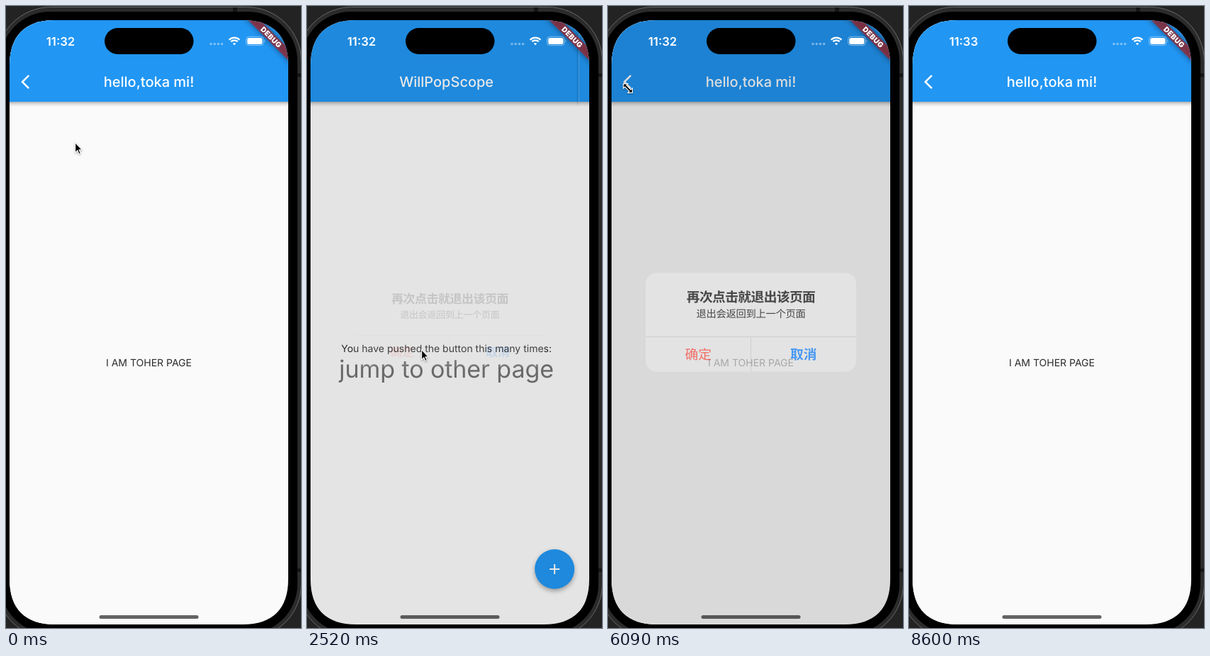
Animation of 416x877 px, one loop 8.62 s. Source, as an HTML page:

```html
<!DOCTYPE html>
<html lang="en">
<head>
<meta charset="utf-8">
<title>Confirm before leaving</title>
<style>
  html, body { margin: 0; width: 100%; height: 100%; overflow: hidden; background: #000; }
  svg { display: block; width: 100%; height: 100%; }
  text { font-family: Inter, Roboto, sans-serif; text-anchor: middle; text-rendering: geometricPrecision; }
  .bar-title { font-size: 20px; font-weight: 500; fill: #fff; }
  .body { font-size: 14px; fill: #2b2b2b; }
  .headline { font-size: 34px; letter-spacing: -.07px; fill: #737373; }
  .clock { font-size: 16.7px; font-weight: 600; fill: #fff; }
  .debug { font-size: 10.2px; font-weight: 900; letter-spacing: .3px; fill: #fff; }
  #alert text { font-family: "Noto Sans CJK SC", "Noto Sans CJK", sans-serif; font-size: 17px; }
  #alert .title { font-weight: 700; letter-spacing: -.5px; }
  #alert .note { font-size: 13px; letter-spacing: -.25px; }
  #alert .cancel { font-weight: 700; fill: #007aff; }
  #alert .ok { fill: #ff3b30; }
  .fab { filter: drop-shadow(0 3px 3px rgba(0, 0, 0, .32)); }
  .ribbon { filter: drop-shadow(0 0 4px rgba(0, 0, 0, .75)); }
  .pointer { fill: #000; stroke: #fff; stroke-width: 1.1; filter: drop-shadow(0 1px 1px rgba(0, 0, 0, .35)); }
</style>
</head>
<body>
<svg viewBox="0 0 416 877" preserveAspectRatio="none">
  <defs>
    <clipPath id="screen">
      <path d="M5 84C5 42 27 20 69 20H334C376 20 398 42 398 84V808C398 850 376 872 334 872H69C27 872 5 850 5 808Z"/>
    </clipPath>
    <linearGradient id="under" x2="0" y2="1">
      <stop stop-opacity=".3"/>
      <stop offset=".4" stop-opacity=".13"/>
      <stop offset="1" stop-opacity="0"/>
    </linearGradient>
    <g id="sheet">
      <rect x="5" y="20" width="393" height="852" fill="#fafafa"/>
      <rect x="5" y="135" width="393" height="7" fill="url(#under)"/>
      <rect x="5" y="20" width="393" height="115" fill="#2196f3"/>
    </g>
  </defs>

  <!-- device body -->
  <rect width="416" height="877" fill="#232323"/>
  <rect x="-13.5" y="1.5" width="430" height="890" rx="77" fill="#2b2b2b" stroke="#686868"/>
  <path d="M320 2h6v6h-6zM411 95h5v5h-5zM411 793h5v5h-5z" fill="#151515"/>
  <rect x="-8" y="8" width="419" height="877" rx="70"/>

  <g clip-path="url(#screen)">
    <g id="home">
      <use href="#sheet"/>
      <text class="bar-title" x="201.5" y="114">WillPopScope</text>
      <text class="body" x="201.5" y="487.5">You have pushed the button this many times:</text>
      <text class="headline" x="201.5" y="524">jump to other page</text>
      <circle class="fab" cx="354" cy="794" r="28" fill="#2196f3"/>
      <path d="M347 794h14M354 787v14" stroke="#fff" stroke-width="2"/>
    </g>
    <g id="other">
      <rect x="2" y="20" width="3" height="119" fill-opacity=".08"/>
      <use href="#sheet"/>
      <path d="M32.2 97.8L23 107L32.2 116.2" fill="none" stroke="#fff" stroke-width="2.5"/>
      <text class="bar-title" x="201.5" y="114">hello,toka mi!</text>
      <text class="body" x="201.5" y="508.3">I AM TOHER PAGE</text>
    </g>
    <rect id="barrier" x="5" y="20" width="393" height="852"/>
    <g id="alert">
      <rect x="66.5" y="382.5" width="270" height="127" rx="14" fill="#e8e8e8"/>
      <path d="M66.5 464.5H336.5M201.5 464.5V509.5" stroke="#cdcdcd"/>
      <text class="title" x="201.5" y="419.3">再次点击就退出该页面</text>
      <text class="note" x="201.5" y="439.7">退出会返回到上一个页面</text>
      <text class="ok" x="134" y="493.5">确定</text>
      <text class="cancel" x="269" y="493.5">取消</text>
    </g>

    <!-- system overlays -->
    <g transform="translate(398 20) rotate(45)">
      <rect class="ribbon" x="-60" y="28" width="120" height="12" fill="#b71c1c" fill-opacity=".63"/>
      <text class="debug" y="37.7">DEBUG</text>
    </g>
    <text id="clock" class="clock" x="77" y="55.5"></text>
    <rect x="139" y="31" width="125.5" height="37" rx="18.5"/>
    <g fill="none" stroke="#fff">
      <path d="M289 53.5H305" stroke-width="3.6" stroke-linecap="round" stroke-dasharray="0 5.2" stroke-opacity=".4"/>
      <path d="M314.6 47.6A10.5 10.5 0 0 1 329.4 47.6M317.3 50.3A6.6 6.6 0 0 1 326.7 50.3" stroke-width="2.3"/>
      <rect x="338.5" y="43.2" width="24.6" height="12.4" rx="4" stroke-opacity=".45"/>
    </g>
    <g fill="#fff">
      <path d="M322 55.2L319.9 53A3 3 0 0 1 324.1 53Z"/>
      <rect x="340.2" y="44.9" width="21.2" height="9" rx="2.6"/>
      <path d="M364.5 47.3q2 2 0 4z" fill-opacity=".45"/>
    </g>
    <rect x="131.5" y="859" width="140" height="5" rx="2.5" fill-opacity=".6"/>
  </g>

  <path id="arrow" class="pointer" d="M.6 .6V14.8L3.8 11.8L6 16.8L8.3 15.8L6.1 10.9H10.4Z"/>
  <path id="resize" class="pointer" d="M.6 .6H7L5 2.8L11.2 9L13.4 7V13.4H7L9 11.2L2.8 5L.6 7Z"/>
</svg>
<script>
  const LOOP = 8620, TICK = 148.2;
  const $ = id => document.getElementById(id);

  const back = [930, 5970], confirm = 2380, add = 4400, cancel = 7247, minute = 6500;

  const progress = (t, start, length) => Math.min(1, Math.max(0, (t - start) / length));
  const easeOut = (p, power) => 1 - (1 - p) ** power;
  const smooth = p => p * p * (3 - 2 * p);
  const mix = (a, b, p) => a + (b - a) * p;

  // The pointer rests at each stop from `at` until `leave`.
  const stop = (x, y, at, leave = at) => ({ x, y, at, leave });
  const tours = {
    arrow: [stop(97, 192, 0), stop(29, 98, 1186), stop(207, 460, 1930), stop(161, 484, 2371, 2520), stop(345, 760, 3000)],
    resize: [stop(375, 864, 3850), stop(350, 800, 4150, 4446), stop(35, 28, 5039), stop(29, 123, 5336, 5484),
      stop(21, 109, 5780, 6080), stop(243, 481, 6965, 7262), stop(330, 860, 8155)]
  };

  function position(tour, t) {
    const next = tour.findIndex(s => s.leave >= t);
    if (next < 0 || t < tour[0].at) return null;
    const to = tour[next], from = tour[Math.max(next - 1, 0)];
    const p = smooth(progress(t, from.leave, to.at - from.leave || 1));
    return [mix(from.x, to.x, p), mix(from.y, to.y, p)];
  }

  const move = (id, x, y = 0) => $(id).setAttribute('transform', `translate(${x} ${y})`);
  const show = (id, visible) => $(id).style.display = visible ? '' : 'none';

  function drawPages(t) {
    const away = easeOut(progress(t, confirm, 330), 6) - easeOut(progress(t, add, 330), 6);
    move('home', -131 * (1 - away));
    move('other', 393 * away);
    show('other', away < 1);
  }

  function drawAlert(t) {
    const [open, close] = t < add ? [back[0], confirm] : [back[1], cancel];
    const shown = easeOut(progress(t, open, 250), 2);
    const left = 1 - progress(t, close, 250);
    const scale = 1 + .3 * (1 - shown);
    $('barrier').setAttribute('opacity', .2 * shown * left);
    $('alert').setAttribute('opacity', shown * left ** 2.5);
    $('alert').setAttribute('transform', `translate(201.5 446) scale(${scale}) translate(-201.5 -446)`);
  }

  function drawPointers(t) {
    for (const id in tours) {
      const spot = position(tours[id], t);
      show(id, spot);
      if (spot) move(id, ...spot);
    }
  }

  function frame() {
    const t = Math.floor(performance.now() % LOOP / TICK) * TICK;
    drawPages(t);
    drawAlert(t);
    drawPointers(t);
    $('clock').textContent = t < minute ? '11:32' : '11:33';
    requestAnimationFrame(frame);
  }
  frame();
</script>
</body>
</html>
```
